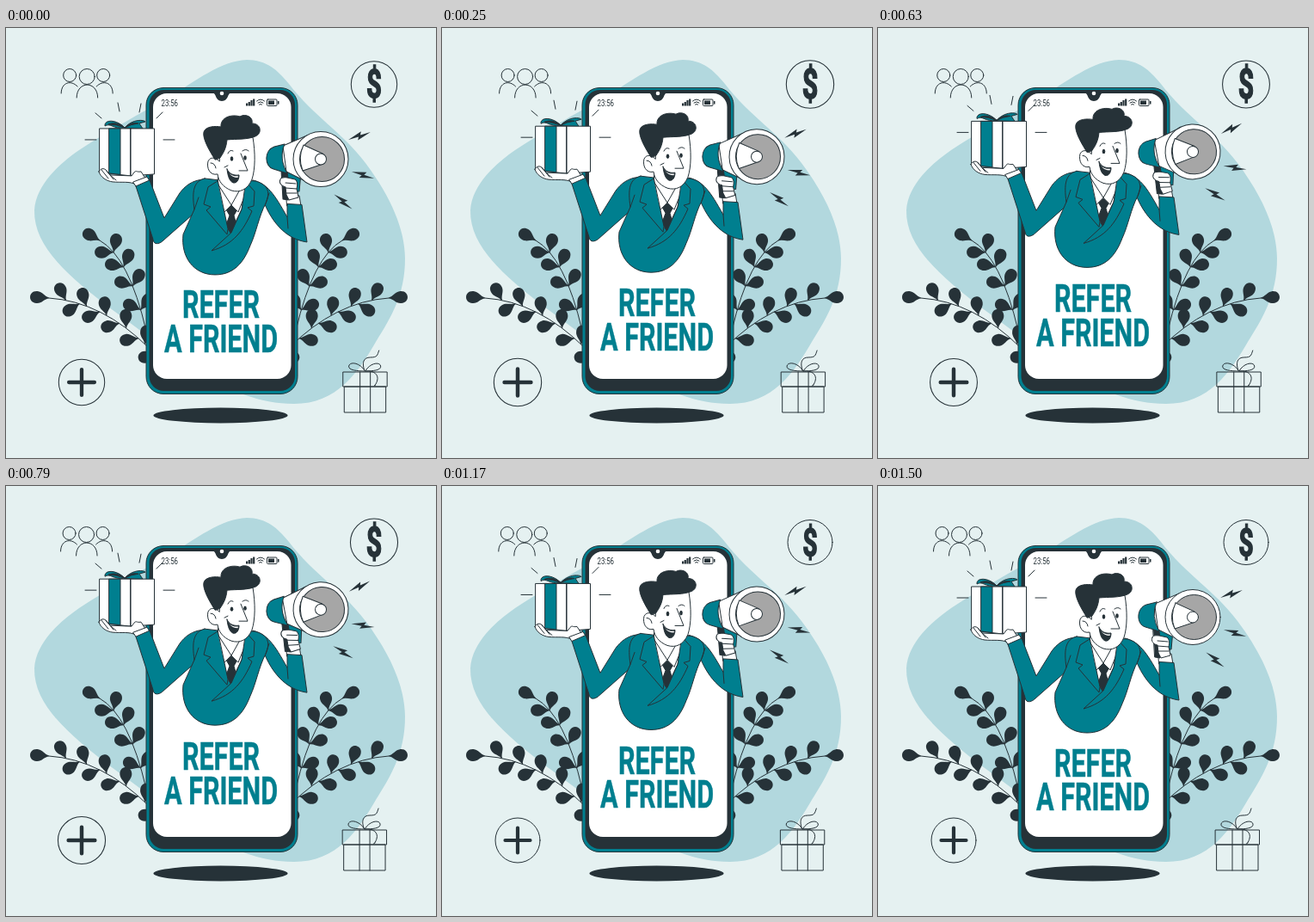
An HTML page for the animation above (1.54 s loop, 500 px wide and 500 px high).

```html
<!DOCTYPE html>
<html lang="en">
<head>
<meta charset="utf-8">
<title>Refer a friend</title>
<style>
  html, body { margin: 0; height: 100%; overflow: hidden; background: #e5f1f1; }
  svg { display: block; width: 100%; height: 100%; }
  .ink { fill: #263238; }
  .teal { fill: #007f8f; }
  .white { fill: #fff; }
  .line { fill: none; }
  .line, .edge { stroke: #263238; stroke-width: 1; stroke-linejoin: round; stroke-linecap: round; }
  text { font-family: Roboto, "Liberation Sans", sans-serif; }
  .title { font-size: 45px; font-weight: 700; text-anchor: middle; stroke: #007f8f; stroke-width: .5; }
</style>
</head>
<body>
<svg viewBox="0 0 500 500">
  <defs>
    <path id="leaf" class="ink" d="M0-.5C5-1 8-7 14-7S22-3 22 0 20 7 14 7 5 1 0 .5Z"/>
    <path id="bolt" class="ink" d="M-13 4L2-5 1-1 13-4-2 5-1 1Z"/>
  </defs>

  <path fill="#b2d8de" d="M280 37C303 37 316 49 329 65C358 103 390 120 418 157C448 197 464 235 464 268C464 310 448 336 430 365C409 401 385 437 335 437C255 437 190 375 120 325C75 290 32 255 33 212C35 182 62 158 85 142C120 119 155 100 190 80C220 62 250 38 280 37Z"/>
  <ellipse class="ink" cx="249.500" cy="450.500" rx="78" ry="9"/>
  <g id="plants"></g>

  <!-- phone -->
  <rect class="teal edge" x="163" y="69.500" width="176" height="356" rx="20"/>
  <rect class="ink" x="166.500" y="72" width="169.500" height="350" rx="17"/>
  <rect class="white" x="171" y="76" width="160.500" height="332" rx="16"/>
  <path class="ink" d="M240 75C245 76 243 85 251 85S257 76 262 75Z"/>
  <circle class="white" cx="251" cy="76" r="2.300"/>
  <text class="ink" transform="translate(180.500 91) scale(.68 1)" font-size="11.500">23:56</text>
  <path class="ink" d="M279 87.500h2.200v3h-2.200zM281.700 86h2.200v4.500h-2.200zM284.400 84h2.200v6.500h-2.200zM287.100 82.500h2.200v8h-2.200z"/>
  <path class="line" d="M291.500 85Q296 81 300.500 85M293 87Q296 84.500 299 87M294.500 89Q296 88 297.500 89"/>
  <rect class="line" x="303.500" y="83" width="11.500" height="7.500" rx="1"/>
  <path class="ink" d="M305 84.500h7v4.500h-7zM316 85h1.500v3.500h-1.500z"/>

  <g id="title" class="teal">
    <text class="title" transform="translate(250 337.500) scale(.68 1)">REFER</text>
    <text class="title" transform="translate(250 377) scale(.68 1)">A FRIEND</text>
  </g>

  <!-- icons -->
  <g class="beat" data-center="428 65.500">
    <circle class="line" r="26"/>
    <text class="ink" transform="translate(0 15.500) scale(.68 1)" font-size="45" font-weight="700" text-anchor="middle" stroke="#263238" stroke-width="1.500">$</text>
  </g>
  <g class="beat" data-center="88 412">
    <circle class="line" r="26"/>
    <path class="line" style="stroke-width:4.200" d="M-14.500 0h29M0-14.500v29"/>
  </g>
  <g class="shake line">
    <circle cx="94.500" cy="56.500" r="9"/>
    <path d="M82.500 81C82.500 61 107 61 107 81M64.500 76C64.500 63 76 60 83.500 68M105.500 68C113 60 124.500 63 124.500 76"/>
    <circle cx="74.500" cy="55" r="7.500"/><circle cx="113.500" cy="55" r="7.500"/>
  </g>
  <g class="shake line">
    <path d="M392.500 400h51v17h-51zM394 417h48v30h-48zM412 400v47M424 400v47"/>
    <path d="M418 399C411 388 400 388 399 393S409 399 418 399C424 389 435 388 436 393S427 399 418 399M417 398C414 389 416 383 424 383S432 381 434 375M419 399C428 398 434 403 432 410S426 417 430 415"/>
  </g>

  <g id="man">
    <path class="line" d="M92 130h13M183 130h13M104 99l7 6M130 87l2 10M157 88l-2 10M182 98l-7 7"/>

    <!-- gift -->
    <g class="edge">
      <path class="teal" d="M138 116C129 106 114 106 115 114C122 110 124 118 138 116C148 105 161 107 162 109L155 111 159 117Z"/>
      <path class="ink" d="M138 116C132 110 124 110 119 112Q128 112 138 116C144 110 150 110 154 111Q145 112 138 116"/>
      <path class="white" d="M109 117h36v55l-36-4zM145 117h27.500v53l-27.500 2z"/>
      <path class="teal" d="M120 117h13v53.500l-13-1.500z"/>
    </g>

    <!-- hands, sleeves and jacket -->
    <g class="edge">
      <path class="white" d="M108 167C110 163 114 163 116 165L121 171 146 172 149 168C152 165 151 168 157 167L164 178 151 182C144 178 134 180 124 179C117 178 110 174 108 167Z"/>
      <path class="line" d="M111 165l8 10M116 165l9 11M121 171l7 6"/>
      <path class="white" d="M148 179l16-6 3 5-15 7z"/>
      <path class="white" d="M326 195h15l2 12h-16z"/>
      <path class="teal" d="M230 176C216 177 208 184 202 192L184 221 167 177 151 184 172 249C174 252 179 251 183 247L217 217Z"/>
      <path class="teal" d="M287 177C304 181 312 193 327 220V204.500L344 205.500 350 249C335 247 314 237 300 203Z"/>
      <path class="teal" d="M231 175L248 177 275 177 290 178C304 182 308 190 302 204C294 219 291 238 284 253C276 274 264 287 243 287C218 287 203 266 206 240L219 211C216 190 218 178 231 175Z"/>
      <path class="line" d="M219 211l5-14M302 204l4-12M327 220l1 13"/>
    </g>

    <!-- shirt, tie and lapels -->
    <g class="edge">
      <path class="white" d="M247 168L246 184 258 234 261 238 274 211 279 182 273 175Z"/>
      <path class="ink" d="M262 206l-6 5 4 7-4 11 6 11 6-11-3-11 4-7z"/>
      <path class="white" d="M246 181L262 206 254 214 245 192ZM276 181L262 206 270 214 279 192Z"/>
      <path class="teal" d="M246 178L235 185 230 205 238 208 233 212 257 240 258 234ZM279 179L289 190 288 207 281 209 286 213C276 236 264 252 239 259L262 238 274 211Z"/>
    </g>

    <!-- head -->
    <g class="edge">
      <path class="white" d="M249 128L287 127C290 145 290 164 286 176C281 188 272 192 262 189C252 185 247 178 246 170C237 172 233 163 235 155C238 149 244 151 248 155Z"/>
      <path class="ink" d="M243 153C238 145 228 129 230 121C232 114 244 114 250 115C249 104 262 100 272 103C279 99 288 104 286 111C297 111 298 123 290 126C281 130 268 129 257 130C256 140 253 145 249 151Z"/>
      <path class="line" d="M238 157q5 0 6 6M258 146q2-5 6-3M275 143q4-3 7 0M273 146L281 166H271M254 162l4-2"/>
      <path class="ink" d="M257 164C259 169 264 172 271 171C271 177 268 181 264 180C260 178 258 173 257 164Z"/>
      <path class="white" stroke="none" d="M259.500 169Q264 173 270 172.300L269.500 174Q263 174 259.500 169Z"/>
    </g>
    <ellipse class="ink" cx="262.500" cy="152" rx="1.800" ry="2.700"/>
    <ellipse class="ink" cx="278" cy="151" rx="1.800" ry="2.700"/>

    <!-- megaphone -->
    <g id="megaphone" class="edge">
      <path class="ink" d="M320 166L328 168 328 200 322 199Z"/>
      <path class="teal" d="M327 167L343 168 341 190 330 190Z"/>
      <path class="white" d="M322 137L350 125V179L326 167Z"/>
      <path class="teal" d="M324 135L312 138C300 142 300 161 311 164L327 169Q317 151 324 135Z"/>
      <circle class="white" cx="366" cy="152.500" r="32"/>
      <circle fill="#a6a6a6" cx="367.500" cy="152.500" r="26"/>
      <path class="white" d="M346 136L368 146C373 150 371 158 366 159L345 166Q339 151 346 136Z"/>
      <circle class="white" cx="366" cy="152.500" r="6.500"/>
      <path class="white" d="M319 176C320 173 324 174 327 174L336 176C339 178 339 183 338 187L340 197 329 200 326 194 325 185C320 184 317 180 319 176Z"/>
      <path class="line" d="M325 180l12 1M325 186l13 1M326 192l12 0"/>
    </g>
    <g class="bolt" data-center="411 125.500" data-angle="-2"><use href="#bolt"/></g>
    <g class="bolt" data-center="415 171" data-angle="33"><use href="#bolt"/></g>
    <g class="bolt" data-center="392 202" data-angle="56"><use href="#bolt"/></g>
  </g>
</svg>

<script>
const LOOP = 1540, STEPS = 37;
const $ = id => document.getElementById(id);
const each = (selector, fn) => document.querySelectorAll(selector).forEach(fn);
const move = (node, value) => node.setAttribute('transform', value);

// A curved stem with a leaf at the tip and staggered leaves along both sides.
function branch([x0, y0], [x1, y1], [x2, y2], first, stagger) {
  const angleTo = (dx, dy) => Math.atan2(-dy, -dx) * 180 / Math.PI;
  const leafAt = (t, turn) => {
    const s = 1 - t;
    const x = s * s * x0 + 2 * s * t * x1 + t * t * x2;
    const y = s * s * y0 + 2 * s * t * y1 + t * t * y2;
    const angle = angleTo(s * (x1 - x0) + t * (x2 - x1), s * (y1 - y0) + t * (y2 - y1));
    return `<use href="#leaf" transform="translate(${x} ${y}) rotate(${angle + turn})"/>`;
  };
  let svg = `<path class="line" d="M${x0} ${y0}Q${x1} ${y1} ${x2} ${y2}"/>` + leafAt(0, 0);
  for (let t = first; t < 1; t += .2) svg += leafAt(t, 52) + leafAt(t + stagger, -50);
  return svg;
}
const low = branch([50, 314], [112, 318], [166, 372], .16, .13);
const high = branch([109, 247], [143, 266], [163, 352], .25, 0);
$('plants').innerHTML = low + high +
  `<g transform="translate(495) scale(-1 1)">${low}</g>` +
  `<g transform="translate(500) scale(-1 1)">${high}</g>`;

// Linear interpolation through [progress, value] pairs.
function track(keys, p) {
  const i = Math.max(1, keys.findIndex(key => key[0] >= p));
  const [p0, a] = keys[i - 1], [p1, b] = keys[i];
  return a + (b - a) * (p - p0) / (p1 - p0);
}
const BEAT = [[0, 1], [.1, 1.1], [.35, 1], [.5, 1.1], [.6, 1], [1, 1]];
const SHAKE = [0, -.25, .5, -1, 1, -1, 1, -1, .5, -.25, 0].map((v, i) => [i / 10, v * 5]);

function draw(now) {
  const step = Math.floor(now % LOOP / LOOP * STEPS);
  const p = (step + 1) / STEPS;
  const lift = (1 - Math.cos(2 * Math.PI * p)) / 2;

  move($('man'), `translate(0 ${-9 * lift})`);
  move($('title'), `translate(0 ${-7.5 * lift})`);
  move($('megaphone'), `rotate(${-3 * lift} 366 152)`);
  each('.bolt', n => move(n, `translate(${n.dataset.center}) rotate(${n.dataset.angle - 8 * lift})`));
  each('.beat', n => move(n, `translate(${n.dataset.center}) scale(${track(BEAT, p)})`));
  each('.shake', n => move(n, `translate(${track(SHAKE, p)} 0)`));
}

const start = performance.now();
function tick() {
  draw(performance.now() - start);
  requestAnimationFrame(tick);
}
tick();
</script>
</body>
</html>
```
